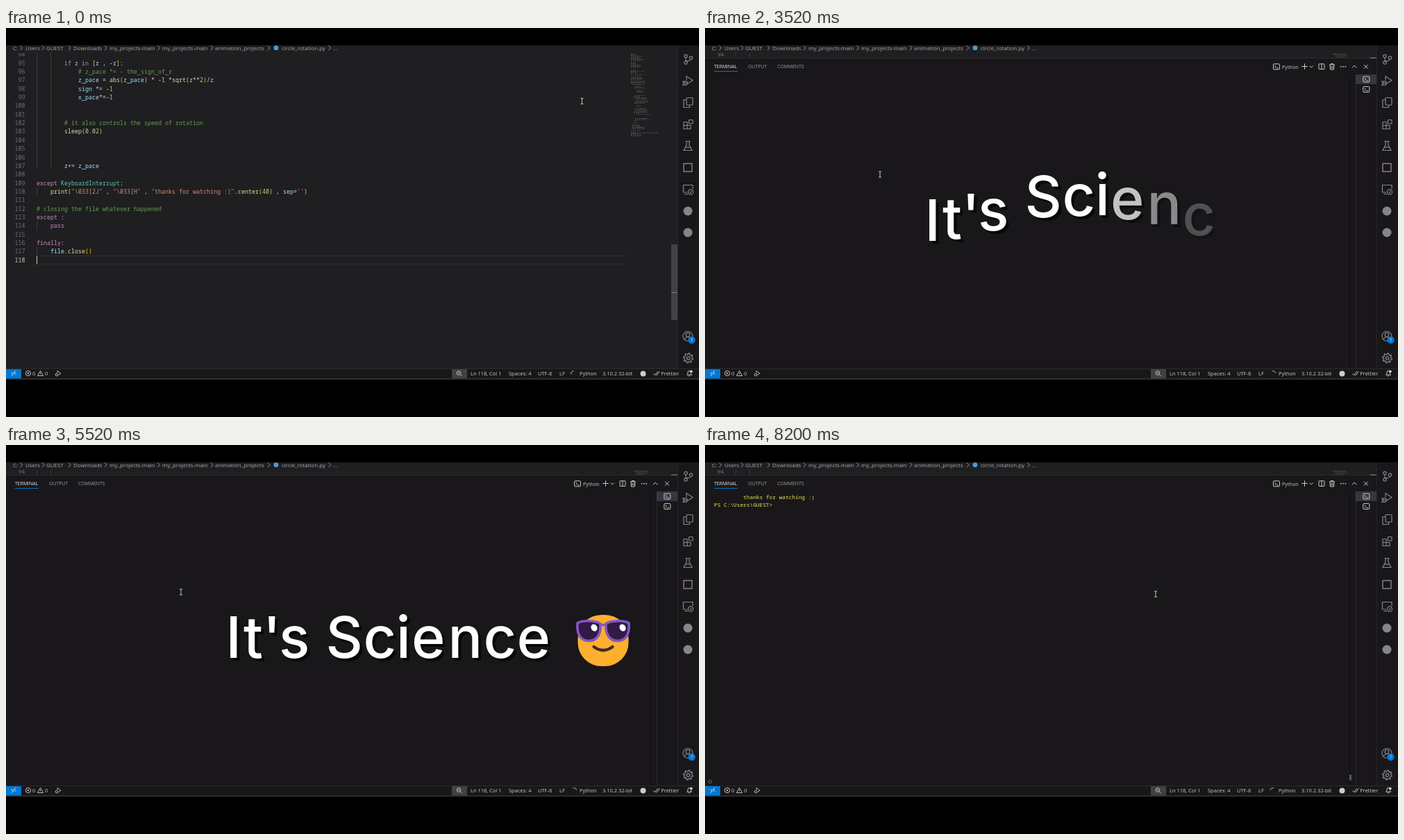
An HTML page with a canvas that plays this animation: 998x561 px, repeating every 8.24 s.

```html
<!DOCTYPE html>
<html lang="en">
<head>
<meta charset="utf-8">
<title>Circle rotation in a terminal</title>
<style>
html, body { margin: 0; width: 100%; height: 100%; overflow: hidden; background: #000; }
canvas { display: block; }
</style>
</head>
<body>
<canvas id="stage" width="998" height="561"></canvas>
<script>
const g = document.getElementById('stage').getContext('2d');
const LOOP = 8240, STEP = 40;
const UI = '"Open Sans", "Noto Sans", sans-serif';
const MONO = '"Noto Sans Mono", "DejaVu Sans Mono", monospace';
const BG = '#1f1e20', DARK = '#19171a', EDGE = '#2b2a2d', BLUE = '#0078d4', ICON = '#868588';
const USER = 'GUEST';

// moments of the story, in ms
const PANEL = 440, BREAK = 1400, MARK = 1720, CLEAR = 2120, SPIN = 2200;
const TITLE = 3135, TITLE_END = 7400, DONE = 7840;

function box(x, y, w, h, c) { g.fillStyle = c; g.fillRect(x, y, w, h); }
function text(s, x, y, size, c, font = UI) {
  g.font = size + 'px ' + font;
  g.fillStyle = c;
  g.fillText(s, x, y);
}
function pen(c, w = 1) { g.strokeStyle = c; g.lineWidth = w; }
function line(...p) {
  g.beginPath();
  for (let i = 0; i < p.length; i += 2) g.lineTo(p[i], p[i + 1]);
  g.stroke();
}
function ring(x, y, r, a = 0, b = 7) { g.beginPath(); g.arc(x, y, r, a, Math.min(b, a + 2 * Math.PI)); g.stroke(); }
function dot(x, y, r, c) { g.fillStyle = c; g.beginPath(); g.arc(x, y, r, 0, 7); g.fill(); }
function frame(x, y, w, h, r = 0) { g.beginPath(); g.roundRect(x, y, w, h, r); g.stroke(); }
function clipped(x, y, w, h, draw) {
  g.save();
  g.beginPath(); g.rect(x, y, w, h); g.clip();
  draw();
  g.restore();
}
function lerpKeys(keys, t) {
  let i = 1;
  while (i < keys.length - 1 && t > keys[i][0]) i++;
  const a = keys[i - 1], b = keys[i];
  const k = Math.min(1, Math.max(0, (t - a[0]) / (b[0] - a[0])));
  return a.slice(1).map((v, j) => v + (b[j + 1] - v) * k);
}

// ---------- editor ----------
const FIRST = 94, PITCH = 12.35;
const CODE = [
  '', '        if z in [r , -r]:', '            # z_pace *= - the_sign_of_r',
  '            z_pace = abs(z_pace) * -1 *sqrt(z**2)/z', '            sign *= -1',
  '            x_pace*=-1', '', '', '        # it also controls the speed of rotation',
  '        sleep(0.02)', '', '', '', '        z+= z_pace', '', 'except KeyboardInterrupt:',
  '    print("\\033[2J" , "\\033[H" , "thanks for watching :)".center(40) , sep=\'\')', '',
  '# closing the file whatever happened', 'except :', '    pass', '', 'finally:',
  '    file.close()', ''
];
const TOKENS = [
  [/^#.*/, '#6a9955'],
  [/^("[^"]*"|'[^']*')/, '#ce9178'],
  [/^(if|in|except|finally|pass)\b/, '#c586c0'],
  [/^KeyboardInterrupt/, '#4ec9b0'],
  [/^[a-z_]+(?=\()/, '#dcdcaa'],
  [/^[a-z_]\w*/, '#9cdcfe'],
  [/^\d+(\.\d+)?/, '#b5cea8'],
  [/^[()[\]]/, '#ffd700'],
  [/^./, '#d4d4d4']
];
function codeLine(s, y) {
  let col = 0;
  while (col < s.length) {
    for (const [re, color] of TOKENS) {
      const m = s.slice(col).match(re);
      if (!m) continue;
      if (m[0] !== ' ') text(m[0], 44 + col * 5, y, 8.34, color, MONO);
      col += m[0].length;
      break;
    }
  }
}
function minimap(open) {
  let seed = 7;
  const rnd = () => (seed = (seed * 16807) % 2147483647) / 2147483647;
  g.globalAlpha = 0.45;
  for (let i = 0; i < 76; i++) {
    const y = 37 + i * 1.58;
    if (i > 4 && rnd() < 0.25) continue;
    const deep = open || (i > 28 && i < 64);
    const x = deep ? 904 + Math.floor(rnd() * 3) * 2 : i < 28 || i > 68 ? 900 : 902;
    let w = 5 + rnd() * 15;
    if (i > 70 && i < 73) w = 38;
    const c = i < 4 && !open ? '#ce9178' : rnd() < 0.25 ? '#6a9955' : rnd() < 0.3 ? '#c586c0' : '#a9b4b8';
    for (let k = 0; k < w; k += 3) box(x + k, y, 1.2 + rnd() * 1.3, 0.9, c);
  }
  g.globalAlpha = 1;
}
function editor(open) {
  box(0, 25, 967, 467, BG);
  clipped(0, 36, 967, open ? 7 : 456, () => {
    box(44, 36, 1, 168, '#3a393c');
    box(64, 36, 1, 168, '#3a393c');
    for (const n of [110, 114, 117]) box(44, 32 + (n - FIRST) * PITCH, 1, PITCH, '#3a393c');
    pen('#2c2b2e');
    line(44, 328.5, 896, 328.5); line(44, 340.5, 896, 340.5);
    CODE.forEach((s, i) => {
      const y = 41.3 + i * PITCH, last = i === CODE.length - 1;
      text(String(FIRST + i), FIRST + i < 100 ? 17.5 : 12.5, y, 8.34, last ? '#cccccc' : '#6e7177', MONO);
      codeLine(s, y);
    });
    box(44, 329, 1, 11.5, '#d0d0d0');
    minimap(open);
    box(958, 312, 9, 109, '#424144');
    box(958, 381, 9, 1, '#7a797c');
  });
}
function breadcrumbs() {
  const crumbs = [['C:', 10, 22], ['Users', 28, 53.5], [USER, 58, 91.5], ['Downloads', 97, 143.5],
    ['my_projects-main', 149, 220], ['my_projects-main', 225, 296.5],
    ['animation_projects', 301, 378.5], ['circle_rotation.py', 397, 466]];
  for (const [s, x, sep] of crumbs) {
    text(s, x, 31.8, 7.95, '#a9a8aa');
    pen('#9a999b');
    line(sep - 1.5, 25.5, sep + 1.5, 28.7, sep - 1.5, 32);
  }
  text('...', 471, 31.8, 7.95, '#a9a8aa');
  dot(389, 28.7, 3.4, '#4b9cd3');
}

// ---------- activity bar ----------
function activityBar() {
  box(967, 25, 31, 467, DARK);
  box(967, 25, 1, 467, '#252427');
  pen(ICON, 1.2);
  ring(979, 40.5, 2.2); ring(986.5, 43, 2.2); ring(979, 50, 2.2);
  line(979, 43, 979, 48);
  g.beginPath(); g.moveTo(986.5, 45); g.quadraticCurveTo(986, 48, 979, 47.5); g.stroke();

  line(980, 75, 980, 69.5, 989, 75.5, 982, 80);
  ring(978.5, 79.5, 2.8);
  line(974, 76.5, 976.5, 78); line(974, 83, 976.5, 81.5); line(975.7, 79.5, 981.3, 79.5);

  frame(980, 100.5, 9, 10.5, 1);
  line(980, 103.5, 976, 103.5, 976, 114.5, 984.5, 114.5, 984.5, 111);

  line(976, 135.5, 976, 145.5, 986, 145.5, 986, 140.5, 976, 140.5);
  line(976, 135.5, 981, 135.5, 981, 145.5);
  frame(983.5, 132.5, 5.5, 5.5, 0.5);

  line(978.5, 163.5, 985.5, 163.5);
  line(980, 163.5, 980, 169, 976, 176.5, 988, 176.5, 984, 169, 984, 163.5);
  line(978.5, 172, 985.5, 172);

  pen(ICON, 1.4);
  frame(976, 195.5, 12, 11.5);

  pen(ICON, 1.2);
  line(981, 237, 975.5, 237, 975.5, 226.5, 989, 226.5, 989, 232);
  line(977.5, 239.5, 982, 239.5);
  ring(986, 236.5, 3.6);
  line(984.6, 236.6, 985.7, 237.7, 987.5, 235.4);

  dot(982, 264, 6.5, ICON);
  dot(982, 295, 6.5, ICON);

  ring(982, 444.5, 7);
  ring(982, 442.5, 2.8);
  ring(982, 450.5, 5, 3.5, 5.9);
  dot(987.5, 450, 5.2, BLUE);
  text('1', 985.9, 452.4, 6.2, '#fff');

  pen(ICON, 1.3);
  ring(982.5, 476, 2.2);
  g.beginPath();
  for (let i = 0; i <= 32; i++) {
    const a = (i + 0.5) * Math.PI / 16, r = i % 4 < 2 ? 7 : 5.2;
    g.lineTo(982.5 + r * Math.cos(a), 476 + r * Math.sin(a));
  }
  g.stroke();
}

// ---------- status bar ----------
const SPINNER = [[0, 310], [1720, 1260], [3520, 2550], [3840, 2760], [5520, 3990],
  [7120, 5010], [8200, 5730], [8240, 5757]];
function statusBar(t) {
  const c = '#cccccc', y = 501.2;
  box(0, 491, 998, 15, DARK);
  box(0, 491, 998, 1, EDGE);
  box(0, 505.5, 998, 1.5, '#353437');
  box(0, 492, 22, 13.5, BLUE);
  box(642, 492, 22, 13.5, '#414043');
  pen('#fff', 1);
  line(8, 496.5, 10.5, 499, 8, 501.5); line(14, 494.5, 11.5, 497, 14, 499.5);
  pen(c, 0.9);
  ring(32, 498, 3.7);
  line(30.5, 496.5, 33.5, 499.5); line(33.5, 496.5, 30.5, 499.5);
  line(49.5, 494.2, 53.5, 501.5, 45.5, 501.5, 49.5, 494.2);
  line(49.5, 497, 49.5, 499.3);
  line(74, 497, 74, 494.5, 79, 498.2, 75.5, 500.7);
  ring(73, 500, 1.8);
  ring(652, 497.5, 2.8);
  line(654, 499.5, 656.5, 502); line(650.7, 497.5, 653.3, 497.5);
  text('0', 38, y, 7.5, c); text('0', 56, y, 7.5, c);
  for (const [s, x] of [['Ln 118, Col 1', 669], ['Spaces: 4', 724], ['UTF-8', 766], ['LF', 797],
    ['Python', 826], ['3.10.2 32-bit', 859], ['Prettier', 943.2]]) text(s, x, y, 7.5, c);
  const mid = (lerpKeys(SPINNER, t)[0] - 90) * Math.PI / 180;
  pen(c, 0.9);
  ring(817.8, 498.7, 4, mid - 0.85, mid + 0.85);
  dot(917.5, 498.5, 4, c);
  pen(c, 1);
  line(932.5, 498.5, 934.5, 500.8, 938.8, 495.2);
  line(936.5, 500, 937.2, 500.8, 941.5, 495.2);
  line(980.8, 500.3, 987.5, 500.3, 986.4, 498.3, 986.4, 496.5);
  line(980.8, 500.3, 981.9, 498.3, 981.9, 496.5);
  ring(984.1, 496.7, 2.2, Math.PI, 2 * Math.PI);
  line(983.2, 502, 985, 502);
  dot(986.8, 495.3, 1.9, c);
}

// ---------- terminal panel ----------
const CELL = 4.68, ROW = 11.45;
function term(s, col, row, color) { text(s, 13 + col * CELL, 77.7 + row * ROW, 7.8, color, MONO); }
function shellIcon(x, y) {
  frame(x - 4.5, y - 4, 9, 8, 1);
  line(x - 2.6, y - 2, x - 0.6, y, x - 2.6, y + 2);
  line(x, y + 2, x + 2.6, y + 2);
}
function panelChrome() {
  box(0, 43, 967, 448, DARK);
  box(0, 43, 967, 1, EDGE);
  box(958, 42.5, 9, 1.3, '#77767a');
  text('TERMINAL', 13, 58.3, 6.9, '#e4e4e4');
  text('OUTPUT', 62, 58.3, 6.9, '#9b9a9c');
  text('COMMENTS', 104, 58.3, 6.9, '#9b9a9c');
  box(13, 62, 34, 1, BLUE);
  box(928, 68, 1, 423, '#0f0e11');
  box(937, 67, 1, 424, '#2a292c');
  box(938, 67, 29, 14, '#36373c');
  box(937, 67, 1, 14, '#1d4a73');
  pen('#c8c8c8', 1);
  shellIcon(823, 55.8); shellIcon(952.3, 74); shellIcon(952.3, 88.5);
  text('Python', 831, 58.5, 7.2, '#c8c8c8');
  line(859.3, 55.5, 867.7, 55.5); line(863.5, 51.3, 863.5, 59.7);
  line(870.8, 54.5, 873.2, 57, 875.6, 54.5);
  frame(884, 51.8, 8, 7.6, 0.5); line(888, 51.8, 888, 59.4);
  line(899, 53, 907, 53); line(901.5, 53, 901.5, 51.5, 904.5, 51.5, 904.5, 53);
  line(900, 53, 900.5, 60, 905.5, 60, 906, 53);
  line(902, 55, 902, 58.5); line(904, 55, 904, 58.5);
  for (const x of [915.7, 919, 922.3]) dot(x, 55.7, 0.9, '#c8c8c8');
  line(932, 57.3, 935.2, 54, 938.4, 57.3);
  line(949, 52.8, 954.8, 58.6); line(954.8, 52.8, 949, 58.6);
}
function mark(y) { pen('#77767a', 0.9); ring(7.2, y, 2.3); }
function shell(t) {
  const yellow = '#f0e64a', prompt = 'PS C:\\Users\\' + USER + '>';
  term('thanks for watching :)', 9, 0, yellow);
  term(prompt, 0, 1, yellow);
  mark(485.7);
  box(928, 475.5, 3, 8, '#5b5a5d');
  if (t >= BREAK && t < DONE) {
    term('^C', 19, 1, '#cf7a4a');
    term(prompt, 0, 2, yellow);
    box(928, 87, 3, 8, '#5b5a5d');
    if (t >= MARK) mark(97.3);
  }
}

// dashed circle turning about its vertical axis
function circle(t) {
  const turn = Math.abs(Math.cos(Math.PI * (t - 7120) / 800));
  const half = y => Math.max(1, Math.ceil(Math.min(16, 16.3 * Math.sqrt(1 - y * y / 121)) * turn - 1e-6));
  const dash = (col, row) => box(13.6 + col * CELL, 178 + row * ROW, 3.8, 1, '#8f8a3f');
  for (let y = -10; y <= 10; y++) {
    const out = half(y), d = Math.abs(y);
    const inner = d === 10 ? 0 : Math.max(0, Math.min(out, half(d + 1)) - 1);
    for (let c = inner; c < out; c++) {
      dash(35 - c, y + 10);
      if (y) dash(36 + c, y + 10);
    }
  }
}

// ---------- title ----------
const WORDS = "It's Science";
const CENTERS = [327.5, 355.5, 383, 415, 0, 487.5, 538, 572, 608, 661, 711, 759.5];
const HOP = [0, 8, 24, 31, 37, 36, 34, 22, 15, 8, 3, 0, -2, -1, 0];
const BEAT = 35;
function hop(u) {
  const i = Math.min(HOP.length - 2, Math.floor(u)), k = Math.min(1, u - i);
  return HOP[i] + (HOP[i + 1] - HOP[i]) * k;
}
function letter(ch, cx, y) {
  const glyph = ch === 'i' ? 'ı' : ch;
  const m = g.measureText(glyph);
  const x = cx - (m.actualBoundingBoxRight - m.actualBoundingBoxLeft) / 2;
  for (const [d, c] of [[4, '#08080a'], [0, '#fff']]) {
    g.fillStyle = c;
    g.fillText(glyph, x + d, y + d);
    if (ch === 'i') dot(cx + d, y - 57.5 + d, 5.7, c);
  }
}
function emoji(x, y) {
  g.save();
  g.translate(x, y);
  g.fillStyle = '#fdaf2e';
  g.beginPath(); g.roundRect(-36.5, -37, 73, 74, 34); g.fill();
  g.lineCap = 'round';
  pen('#44292c', 4.2);
  g.beginPath(); g.moveTo(-13.5, 9); g.quadraticCurveTo(0, 19, 13.5, 9); g.stroke();
  pen('#8257c4', 3.6);
  line(-5, -22.5, 5, -22.5);
  for (const s of [-1, 1]) {
    g.fillStyle = '#321a46';
    g.beginPath();
    g.moveTo(s * 4, -24);
    g.bezierCurveTo(s * 9, -29, s * 31, -30, s * 37, -25);
    g.bezierCurveTo(s * 38.5, -9, s * 32, 0.5, s * 21, 0.5);
    g.bezierCurveTo(s * 9, 0.5, s * 3, -9, s * 4, -24);
    g.closePath(); g.fill(); g.stroke();
  }
  g.fillStyle = '#fff';
  for (const hx of [-13, 28]) {
    g.beginPath(); g.ellipse(hx, -18.5, 4.3, 5.3, -0.5, 0, 7); g.fill();
  }
  g.restore();
}
function title(t) {
  g.font = '500 82.5px Inter, "Open Sans", sans-serif';
  for (let i = 0; i < 14; i++) {
    const u = (t - TITLE) / BEAT - i;
    if (u <= 0 || i === 4 || i === 12) continue;
    g.globalAlpha = Math.min(1, u / 4);
    if (i < 12) letter(WORDS[i], CENTERS[i], 307 - hop(u));
    else emoji(860, 282 - hop(u));
  }
  g.globalAlpha = 1;
}

// ---------- pointer ----------
const PATH = [[2680, 430, 55], [3000, 320, 150], [3400, 252, 210], [3520, 252, 211], [3840, 252, 212],
  [6080, 252, 212], [6560, 390, 154], [6880, 520, 153], [7120, 578, 169], [7640, 649, 215]];
function pointer(t) {
  if (t >= 1000 && t < PATH[0][0]) return;
  const [x, y] = t < 1000 ? [829.5, 105.5] : lerpKeys(PATH, t);
  pen('#c4c4c4', 1);
  line(x, y - 4, x, y + 4);
  line(x - 2, y - 4, x + 2, y - 4);
  line(x - 2, y + 4, x + 2, y + 4);
}

function draw(t) {
  const open = t >= PANEL, n = Math.round(t / STEP);
  box(0, 0, 998, 561, '#000');
  editor(open);
  breadcrumbs();
  if (open) {
    panelChrome();
    if (t < CLEAR || t >= DONE) shell(t);
    // the screen is wiped between prints, so the circle flickers
    else if (t >= SPIN && n % 7 % 3 === 0) circle(t);
  }
  activityBar();
  statusBar(t);
  if (t >= TITLE && t < TITLE_END) title(t);
  pointer(t);
}

let start;
function tick(now) {
  if (start === undefined) start = now;
  draw(Math.floor((now - start) % LOOP / STEP + 0.01) * STEP);
  requestAnimationFrame(tick);
}
draw(0);
requestAnimationFrame(tick);
</script>
</body>
</html>
```
